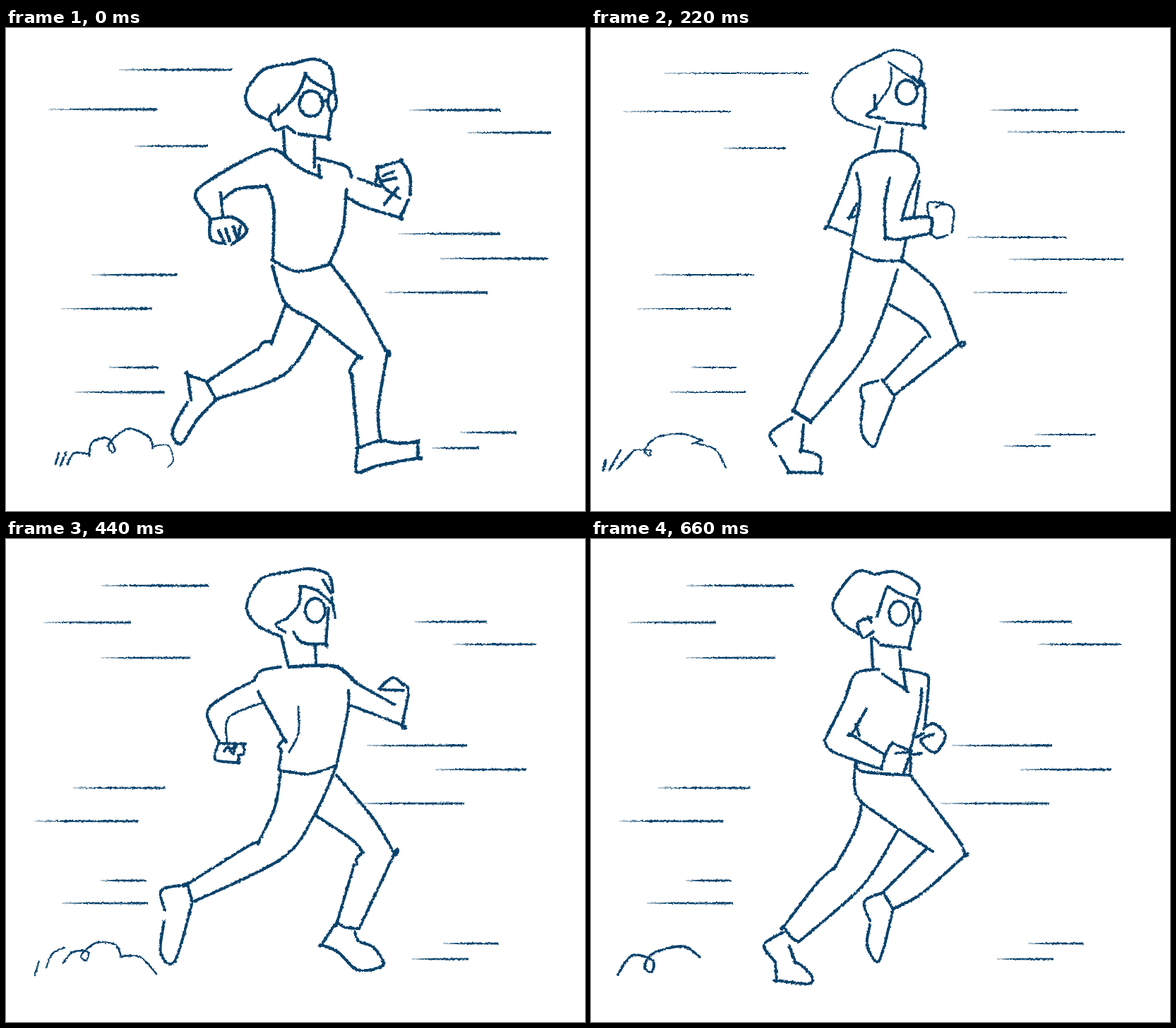
Write an HTML page that moves like this. It is 820x683 px and loops after 770 ms.

```html
<!DOCTYPE html>
<html lang="en">
<head>
<meta charset="utf-8">
<title>Runner</title>
<style>
  html, body { margin: 0; width: 100%; height: 100%; overflow: hidden; background: #fff; }
  svg { display: block; width: 100%; height: 100%; }
  .ink { fill: none; stroke: #08426b; stroke-linecap: round; stroke-linejoin: round; }
</style>
</head>
<body>
<svg id="stage" viewBox="0 0 820 683">
  <defs>
    <filter id="crayon" filterUnits="userSpaceOnUse" x="0" y="0" width="820" height="683" color-interpolation-filters="sRGB">
      <feTurbulence type="fractalNoise" baseFrequency=".3" numOctaves="2" seed="4"/>
      <feDisplacementMap in="SourceGraphic" scale="3.5" xChannelSelector="R" yChannelSelector="G"/>
    </filter>
    <linearGradient id="fade">
      <stop offset="0" stop-color="#08426b" stop-opacity=".5"/>
      <stop offset=".3" stop-color="#08426b"/>
    </linearGradient>
  </defs>
</svg>
<script>
const STEP = 110;
const stage = document.getElementById('stage');
let layer;

function add(parent, tag, attrs) {
  const node = document.createElementNS('http://www.w3.org/2000/svg', tag);
  for (const key in attrs) node.setAttribute(key, attrs[key]);
  return parent.appendChild(node);
}

// Smooth curve through a few points; "!" marks a sharp corner.
function spline(text) {
  const pts = text.trim().split(/\s+/).flatMap(word => {
    const p = word.replace('!', '').split(',').map(Number);
    return word.endsWith('!') ? [p, p] : [p];
  });
  const at = i => pts[Math.max(0, Math.min(pts.length - 1, i))];
  let d = 'M' + pts[0];
  for (let i = 0; i < pts.length - 1; i++) {
    const [a, b, c, e] = [at(i - 1), at(i), at(i + 1), at(i + 2)];
    const out = b.map((v, k) => v + (c[k] - a[k]) / 6);
    const into = c.map((v, k) => v - (e[k] - b[k]) / 6);
    d += `C${out} ${into} ${c}`;
  }
  return d;
}

// Draws strokes separated by "/".
function ink(text, width) {
  for (const stroke of text.split('/'))
    add(layer, 'path', { d: spline(stroke), ...(width && { 'stroke-width': width }) });
}
const lens = (cx, cy, rx, ry) => add(layer, 'ellipse', { cx, cy, rx, ry });

// Tapered speed lines given as left, right, height.
function gusts(width, text) {
  for (const line of text.split(' ')) {
    const [left, right, y] = line.split(',').map(Number);
    const knee = left + (right - left) * .35;
    add(layer, 'path', {
      d: `M${left},${y - .4}L${knee},${y - width * .4}L${right},${y - width / 2}v${width}L${knee},${y + width * .4}L${left},${y + .4}z`,
      fill: 'url(#fade)', stroke: 'none'
    });
  }
}

function windFar() {
  gusts(3.4, '160,320,59 60,214,115 182,286,167 121,242,349 78,207,397 146,216,480 98,225,515');
  gusts(3.4, '572,700,116 653,772,148 557,700,291 614,768,326 537,682,374 643,723,572 603,670,594');
}
function windMid() {
  gusts(3, '135,287,66 53,177,118 135,261,168 95,226,352 40,187,399 134,199,483 79,201,515');
  gusts(3, '578,682,117 633,750,149 511,653,292 608,737,326 494,649,374 619,698,572 575,655,594');
}
function windNear() {
  gusts(2.2, '104,308,64 46,198,118 188,275,170 90,231,349 66,198,397 142,206,480 112,219,515');
  gusts(2.2, '565,690,116 590,756,147 533,673,296 592,754,327 541,674,374 628,714,575 585,651,591');
}

function dustFar() {
  ink('70,617 75,601/77,619 85,600/87,617 97,601 118,603', 3);
  ink('118,605 122,586 143,580 154,595 150,600 146,588 172,567 202,578 208,594', 3);
  ink('207,592 229,590 237,610 230,621', 2);
}
function dustMid() {
  ink('41,616 47,597/57,606 66,586 83,578', 2.4);
  ink('81,599 95,584 116,584 113,596 107,588 128,571 155,574 163,590! 190,591 213,615', 2.6);
}
function dustNear() {
  ink('17,626 21,611/26,625 42,597/37,623 61,597', 3);
  ink('61,597 83,597 82,605 76,596 95,578 130,574 156,583! 143,588/148,587 176,596 191,622', 2.3);
}
const dustLast = () => ink('38,616 58,589 87,596 86,612 76,605 88,586 130,576 154,591', 3.6);

function stride() {
  ink('409,50 365,59 340,92 347,117 373,131/409,50 437,44 460,57 465,90/389,119 413,92 424,66! 435,76 462,91/386,109 386,122');
  ink('384,116 374,126 381,144 397,140 409,148/415,150 456,155! 461,120/447,104 456,103/393,146 395,180/437,158 437,196');
  lens(432, 107, 16.5, 18);
  lens(462, 104, 6, 14);
  ink('396,182 418,199 444,210! 443,194/369,222 379,255 378,327/377,328 412,344 460,334/482,228 477,285 458,333');
  ink('396,180 368,173 295,211 268,237 290,270/307,242 330,227 370,224/304,233 307,266');
  ink('288,271 322,268 341,287 320,306/289,273 290,299 311,305/301,286 309,303/311,284 317,301/322,281 327,296/332,280 329,295');
  ink('441,184 482,196 489,211/499,213 530,224/484,240 508,253 558,268! 570,243/524,218 527,197! 559,188! 572,208 572,236');
  ink('534,209 549,203/531,217 552,212/526,207 536,226 558,241/536,249 555,226');
  ink('460,334 500,388 540,460! 527,540 531,585/377,336 396,389 440,417 499,464! 487,484 491,492/490,494 499,594');
  ink('396,391 377,443! 364,445 357,455/354,455 285,500/442,420 395,489 297,525/284,501 297,525');
  ink('497,594 530,583/498,596 497,628 526,619 584,608! 583,585! 555,587 533,583');
  ink('284,500 257,490! 262,526/257,529 236,570 248,588 270,555 296,527');
}

function upright() {
  ink('403,52 362,71 347,98 355,126 381,142/403,52 431,45 459,60 464,88/395,123 414,95 422,70! 447,86/430,70 462,89/396,111 395,124');
  ink('393,122 385,138 409,143/410,143 432,156 461,158! 467,121/452,103 458,106/402,149 398,183/438,160 434,194');
  lens(437, 106, 15.5, 17.5);
  lens(466, 106, 6, 12);
  ink('436,201 400,184 374,225 377,265 364,333/452,224 460,243 457,268/364,333 380,340 440,344! 447,315');
  ink('437,203 447,209 446,219', 6);
  ink('441,236 430,255 416,280/405,225 389,265 384,302', 3);
  ink('384,302 415,311 455,311/406,278 425,289 455,297/455,292 458,303 455,316');
  ink('459,290 468,270 481,268/481,272 489,276 486,304 460,312');
  ink('440,344 452,410 449,480/449,484 418,530 403,588/279,509 280,530 291,546');
  ink('374,482 335,490 284,508', 5.5);
  ink('366,587 402,591/363,588 353,624! 439,630! 447,609! 420,601 403,591');
  ink('279,507 257,503! 256,535 242,565 256,604 270,602! 265,596! 291,546');
}
function leftKneeBack() {
  upright();
  ink('366,345 363,378 395,415 414,463/409,466 380,520 366,588/375,394 377,486/375,529 335,543 292,545');
}
function rightKneeBack() {
  upright();
  ink('366,347 363,378 375,394 375,490/429,371 425,465 405,522! 350,541 292,545/375,535 366,588');
}

function lift() {
  ink('411,39 365,62 342,98 359,127 402,143/404,41 432,31 466,46 465,75/421,48 465,78/425,57 423,82 403,111/455,68 470,82', 3.2);
  ink('465,72 473,88 470,138! 418,133/404,113 391,124 416,128/402,95 402,113/461,86 467,80/409,139 402,170/441,143 438,173');
  lens(447, 91, 15, 17);
  ink('398,175 440,175 464,198 449,240 440,272/399,176 373,189 362,215/376,205 381,240 369,312/368,313 400,328 440,329! 446,300/465,216 457,268');
  ink('361,219 335,280! 368,293/376,249 366,268! 376,266/423,212 416,250 417,296! 435,299 481,290');
  ink('442,270 480,268 481,291', 5);
  ink('478,264 478,247 500,248/488,253 502,249 514,259 511,289/481,291 490,297 505,293', 3);
  ink('370,317 358,380 352,425 312,485 286,543/434,342 415,400 383,470 310,558');
  ink('286,541 312,557', 5.5);
  ink('442,329 490,372 521,447! 430,519/423,391 465,417 480,437/473,437 414,500/412,497 430,520');
  ink('285,551 254,573 262,591/268,606 281,628! 324,629! 324,606 298,597! 301,561');
  ink('406,499 383,507 384,525/386,527 383,570 400,592 410,570 430,522');
}

function reach() {
  ink('403,45 365,56 343,95 363,131 400,145/403,45 430,41 460,52 467,72/455,58 469,90 468,110/460,60 465,78/418,65 415,90 397,117/421,63 446,82');
  ink('397,99 398,118/465,97 463,148! 435,149 410,136/403,146 403,178/440,156 440,177');
  ink('396,118 385,133 391,139 406,133', 5);
  lens(441, 101, 14.5, 17);
  ink('412,177 465,184 480,191/372,220 378,320/378,320 395,328 425,330 453,324/469,261 453,323');
  ink('399,207 395,245 385,292', 3);
  ink('480,191 500,230 524,258/456,229 475,259 523,296! 542,238/518,258 526,242 540,237/523,243 507,222! 506,214 519,214');
  ink('521,216 515,206 525,202 542,216 542,236/515,210 524,210/399,179 372,190 325,258 320,275! 378,298/372,246 353,270! 376,283');
  ink('381,327 365,400 340,460/342,454 276,537! 300,547/443,364 420,420 378,480 300,547');
  ink('453,324 500,382 530,452! 515,480 465,550/432,402 470,426 487,446/478,450 490,451/482,453 436,538/434,540 466,552');
  ink('270,541 247,560 252,574/291,553 284,605! 293,626! 260,625! 254,583');
  ink('434,541 418,563 430,572! 450,607 485,614! 488,606 472,591! 461,554');
}

function push() {
  ink('403,46 362,56 341,95 356,122 390,138/403,46 430,42 457,51 463,75/449,58 460,76/417,66 415,92 397,113/417,66 441,73 460,90/461,82 466,111');
  ink('399,112 382,121 396,132/407,131 420,147 453,148! 457,97/390,139 400,180/438,151 439,178');
  lens(438, 101, 14, 17);
  ink('400,181 465,180 496,204', 5);
  ink('357,216 394,283! 386,293 390,300 386,325/485,214 484,245 468,320/386,327 430,332 468,320');
  ink('414,237 414,275 401,301/365,231 316,252 313,288', 3);
  ink('389,181 362,186 352,198/352,200 310,222 285,246 302,287/300,289 336,290! 337,303 329,306/300,291 297,312 328,316! 330,308');
  ink('309,300 315,294 319,302/318,298 325,293 322,304/498,205 550,234/485,234 561,263! 570,215 562,205/528,212 548,196 562,206/530,213 563,214');
  ink('389,329 381,378 358,428! 340,436 257,488! 264,514/468,321 437,390 390,452 265,513');
  ink('468,334 520,395 550,445! 500,551/440,392 490,425 505,443! 496,453 497,460/493,461 469,542! 480,549 500,551');
  ink('253,489 220,497 225,525/224,541 219,585 239,597 263,517');
  ink('465,546 447,574! 470,584 495,608 520,609/494,556 500,569 520,577 535,600 522,608');
}

function swing() {
  ink('402,50 375,47 343,90 355,118 379,134/402,50 430,46 455,57 465,68 462,78/418,70 405,110/420,67 437,77 462,86/392,110 397,118');
  ink('397,111 378,118 385,139 400,131/400,140 407,146/410,150 450,154! 458,120/397,141 399,184/437,158 439,184');
  lens(436, 105, 14, 17);
  lens(461, 104, 5, 15);
  ink('413,191 446,213! 442,185/442,184 474,192 478,205 473,262/468,211 466,240 452,300/376,323 390,330 452,334/375,315 376,323');
  ink('408,184 374,191 359,228 331,284/331,287 345,302 412,326/390,240 369,277! 414,304/375,262 380,278');
  ink('427,288 418,302 411,325/427,289 454,300/452,301 432,303/453,303 443,330/453,310 452,334');
  ink('471,268 485,261 502,278 487,302 467,285 485,276/455,305 468,303/461,280 471,275');
  ink('374,318 376,362 410,392 484,442/453,335 520,425 529,448! 470,500 428,523/476,437 416,497/414,499 428,524');
  ink('383,377 375,410 345,465/347,463 320,487 273,548! 282,562 294,570/435,411 400,470 370,505 295,569');
  ink('273,556 245,574 261,598/281,576 289,598! 303,607 314,622 305,629 263,624! 261,600');
  ink('413,500 387,513 395,540/395,545 391,575 405,598 414,580 427,527');
}

const cycle = [
  [4.4, windFar, dustFar, stride],
  [4.4, windMid, dustMid, leftKneeBack],
  [4, windNear, dustNear, lift],
  [4, windFar, dustFar, reach],
  [4, windMid, dustMid, push],
  [4.4, windNear, dustNear, rightKneeBack],
  [4, windMid, dustLast, swing]
];

const scenes = cycle.map(([width, ...parts]) => {
  layer = add(stage, 'g', { class: 'ink', filter: 'url(#crayon)', 'stroke-width': width, display: 'none' });
  parts.forEach(draw => draw());
  return layer;
});

let shown = -1;
const start = performance.now();
function tick() {
  const index = Math.floor((performance.now() - start) / STEP) % scenes.length;
  if (index !== shown) {
    scenes.forEach((scene, i) => scene.setAttribute('display', i === index ? 'inline' : 'none'));
    shown = index;
  }
  requestAnimationFrame(tick);
}
tick();
</script>
</body>
</html>
```
